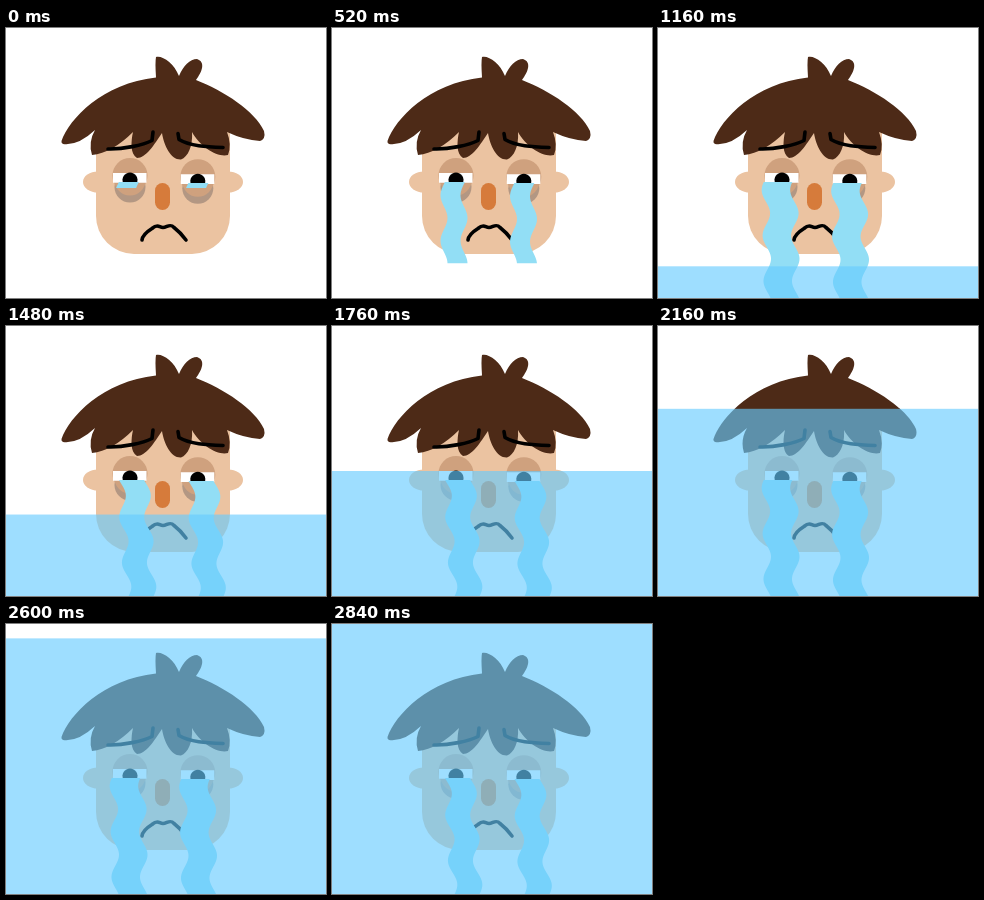
An HTML page that plays this animation: 320 px wide and 270 px high, repeating every 2.88 s.

```html
<!DOCTYPE html>
<html>
<head>
<meta charset="utf-8">
<style>
  html, body { margin: 0; width: 100%; height: 100%; overflow: hidden; background: #fff; }
  svg { display: block; width: 100vw; height: 100vh; }
  .line { fill: none; stroke: #000; stroke-width: 3.6; stroke-linecap: round; stroke-linejoin: round; }
</style>
</head>
<body>
<svg viewBox="0 0 320 270">
  <defs>
    <g id="eye">
      <circle cx="124" cy="159" r="15.5" fill="#b39783"/>
      <circle cx="124" cy="152" r="15.5" fill="#cfa17e"/>
      <circle cx="124" cy="147.5" r="17.5" fill="#cfa17e"/>
      <path fill="#fff" d="M107 145H140.5V154.8H107Z"/>
      <path d="M117 154.8A7.5 7.5 0 1 1 131 154.8Z"/>
    </g>
    <path id="tear" fill="#92def5"/>
    <clipPath id="flow"><rect id="reach" y="150" width="320"/></clipPath>
  </defs>

  <g fill="#ebc3a1">
    <ellipse cx="92" cy="154" rx="15" ry="10.5"/>
    <ellipse cx="222" cy="154" rx="15" ry="10.5"/>
    <path d="M90 95H224V188A38 38 0 0 1 186 226H128A38 38 0 0 1 90 188Z"/>
  </g>
  <path fill="#4d2a17" d="M55.5 113C63 91 97 55 150 49.5Q149 34 150 29
    C156 27 168 35 173 48C177 38 184 31 191 31C200 34 196 44 190 52
    C218 63 249 83 258 103Q260 111 254 113Q238 112 221 104
    Q226 117 222 127C212 130 194 119 186 104
    C187 118 182 129 175 131.5C165 132 158 118 156 105
    C148 117 140 130 131 130C124 126 125 113 127 104
    Q106 125 86 127Q82 114 89 102Q72 118 57 116Q55 115 55.5 113Z"/>
  <g class="line">
    <path d="M102 121C117 121.5 137 117 146 112.500L147 104"/>
    <path d="M172 105.500L173 111.500C184 118 200 119 217 119.500"/>
    <path d="M136 212C136.500 207 142 203 146 200.500C152 195.500 153 199.500 157 199.500S164 195 168 199.500Q174 204 180 212"/>
  </g>
  <use href="#eye"/>
  <use href="#eye" x="67.8" y="1.2"/>
  <rect x="149" y="155" width="15" height="27" rx="7.5" fill="#d67b3b"/>
  <g clip-path="url(#flow)">
    <use href="#tear"/>
    <use href="#tear" x="69.5" y="1"/>
  </g>
  <rect id="water" width="320" height="280" fill="#67cbff" fill-opacity=".635"/>
</svg>
<script>
const LOOP = 2880, STEP = 40, HOLD = 720;
const TOP = 154, WAVE = 45.5;
const $ = id => document.getElementById(id);

const thin = { left: 112, width: 20, sway: 3.5, crest: 190, drift: 0 };
const swayLeft = { left: 108, width: 28.5, sway: 4, crest: 185, drift: 0.02 };
const swayRight = { left: 116.5, width: 25, sway: 4, crest: 169, drift: 0.06 };

// A ribbon whose two edges follow the same sine wave.
function ribbon({ left, width, sway, crest, drift }) {
  const edge = [], back = [];
  for (let y = TOP; y <= 276; y += 2) {
    const x = left + drift * (y - 180) + sway * Math.cos((y - crest) / WAVE * 2 * Math.PI);
    edge.push([x, y]);
    back.unshift([x + width, y]);
  }
  return 'M' + edge.concat(back).join('L') + 'Z';
}

function pose(t) {
  if (t < 960) return thin;
  return Math.floor((t + STEP) / HOLD) % 2 ? swayLeft : swayRight;
}

function draw(now) {
  const t = Math.floor(now % LOOP / STEP) * STEP;
  $('tear').setAttribute('d', ribbon(pose(t)));
  $('reach').setAttribute('height', 10 + 0.1445 * t);
  $('water').setAttribute('y', t < 960 ? 270 : Math.max(0, 145 - 0.1555 * (t - 1760)));
  requestAnimationFrame(() => draw(performance.now()));
}
draw(0);
</script>
</body>
</html>
```
